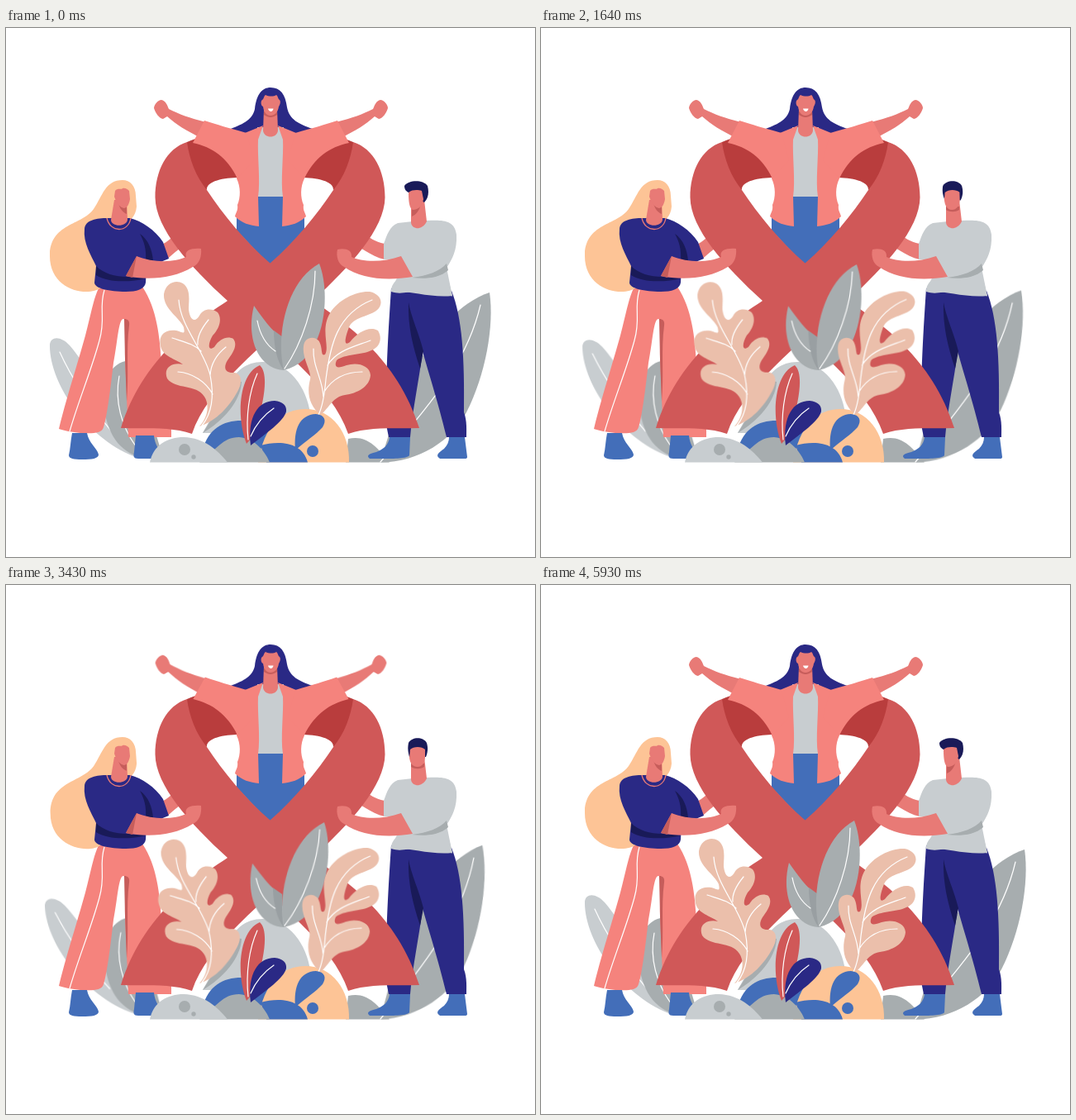
An HTML page without scripts for the animation above (6.07 s loop, 640x640 px).

```html
<!DOCTYPE html>
<html lang="en">
<head>
<meta charset="utf-8">
<title>Ribbon</title>
<style>
html, body { margin: 0; height: 100%; overflow: hidden; background: #fff; }
svg { display: block; width: 100vw; height: 100vh; }

.red { fill: #d05858; } .deep { fill: #b93d3d; }
.coral { fill: #f5837d; } .skin { fill: #e87a76; } .blush { fill: #c65d5b; }
.navy { fill: #2a2985; } .ink { fill: #191a58; } .blue { fill: #436eb9; }
.pale { fill: #c8cdd0; } .gray { fill: #a7adaf; } .slate { fill: #999fa2; }
.peach { fill: #fdc496; } .beige { fill: #ebbfab; }
.vein { fill: none; stroke: #fff; stroke-width: 1.2; stroke-linecap: round; }

.sway, .lift, .raise, .turn { animation: 6070ms cubic-bezier(.37, 0, .63, 1) infinite; }
.sway { animation-name: sway; }
.lift { animation-name: lift; }
.raise { animation-name: raise; }
.turn { animation-name: turn; }
.lift, .turn { d: var(--from); }

.sleeve {
  --from: path("M291 127 C270 121 255 117 240 112 L226 139 C250 144 268 157 280 182 L300 160Z");
  --to: path("M289 127 C281 118 273 110 265 99 L238 114 C244 135 254 148 280 162 L300 160Z");
}
.forearm {
  d: path("M242 114 C222 109 209 104 197 98 C195 93 193 88 188 87 C184 87 179 93 179 97 C181 103 185 109 190 110 L195 107 C206 117 218 124 236 133Z");
  transform-origin: 233px 126px;
  --move: translate(18.5px, -19.5px) rotate(53deg);
}

@keyframes sway {
  0%, 32.6%, 65.1%, 97.7%, 100% { transform: rotate(0deg); }
  16.3%, 48.9%, 81.4% { transform: rotate(var(--a)); }
}
@keyframes lift {
  0%, 22.7%, 35.1%, 57.8%, 70.3%, 93.1%, 100% { d: var(--from); }
  12.2%, 47.3%, 82.5% { d: var(--to); }
}
@keyframes raise {
  0%, 22.7%, 35.1%, 57.8%, 70.3%, 93.1%, 100% { transform: translate(0, 0) rotate(0deg); }
  12.2%, 47.3%, 82.5% { transform: var(--move); }
}
@keyframes turn {
  0%, 4.1%, 32.6%, 36.7%, 65.1%, 69.3%, 97.7%, 100% { d: var(--from); }
  9.9%, 25.1%, 42.4%, 57.7%, 75%, 90.2% { d: var(--to); }
}
</style>
</head>
<body>
<svg viewBox="0 0 640 640">
  <defs>
    <path id="band" class="red" d="M219 138 C194 146 180.500 173 180.500 205 C181 243 222 288 268 330 C330 385 395 435 414 491 C440 482 470 485 500 484 C474 400 409 355 371 330 L320 285 C290 259 262 225 243 196 C230 180 222 160 219 138Z"/>
    <path id="loop" class="deep" d="M219 138 C245 127 270 122 321 122 V181 H282 C264 181 242 185 243 196 C222 180 212 160 219 138Z"/>
    <path id="front" class="coral" d="M311 118 L289 127 L277 150 L279 182 C284 192 284 205 280 214 C281 221 278 223 277 228 C285 236 295 239 306 240 L305 204 C308 185 304 155 305 135Z"/>
  </defs>

  <!-- back foliage -->
  <g class="sway" style="--a:-4.6deg;transform-origin:158px 522px">
    <path class="pale" d="M160 520 C100 500 52 430 53 383 C54 373 66 372 77 384 C98 408 125 460 160 520Z"/>
    <path class="vein" d="M65 392 C80 425 100 455 127 487"/>
  </g>
  <g class="sway" style="--a:2deg;transform-origin:160px 518px">
    <path class="gray" d="M155 402 C129 400 115 425 118 455 C122 490 136 513 165 520 H190Z"/>
    <path class="vein" d="M137 421 C131 452 140 482 157 506"/>
  </g>
  <path class="gray" d="M411 525.500 L414 497 C436 492 448 506 464 525.500Z"/>
  <g class="sway" style="--a:-4.4deg;transform-origin:455px 525px">
    <path class="gray" d="M453 525.500 C470 465 510 345 585 320 C591 360 580 420 557 465 C540 498 500 525.500 453 525.500Z"/>
    <path class="vein" d="M574 335 C560 395 528 440 453 525"/>
  </g>

  <!-- legs and far arms -->
  <path class="coral" d="M112 315 L165 313 C183 340 186 375 188 405 L200 486 V495 H148 L144 400 C144 370 146 352 142 352 C136 352 135 380 130 405 C126 440 122 470 118 483 C116 492 100 490 90 490 C80 489 70 487 64 485 C75 440 92 390 99 360 C104 340 107 325 112 315Z"/>
  <path class="blush" d="M143 352 C147 352 150 354 149 360 C145 390 149 420 146 452 L144 400Z"/>
  <path class="vein" d="M119 317 C112 340 121 350 113 378 C104 412 88 450 77 488"/>
  <path class="blue" d="M80 490 H98 C100 502 110 508 112 516 C112 521 104 522 92 522 C82 522 76 521 76 517 C78 508 78 500 80 490Z"/>
  <path class="blue" d="M157 493 H179 C180 505 186 510 188 516 V521 H160 C154 521 154 518 155 513Z"/>
  <path class="navy" d="M466 315 C490 312 515 318 539 318 C552 350 555 400 554 465 C558 475 557 488 557 495 H533 C522 450 512 420 504 391 C500 425 492 460 489 495 H463 L460 480 C459 420 463 360 466 315Z"/>
  <path class="ink" d="M487 332 C490 350 500 370 505 391 L501 412 C492 385 486 360 487 332Z"/>
  <path class="blue" d="M464 495 H489 L488 517 C486 521 470 521 455 521 H440 C435 517 440 515 448 513 C456 510 463 505 464 495Z"/>
  <path class="blue" d="M536 495 H555 L558 519 Q558 521 555 521 H525 C519 517 523 514 530 509 C534 505 536 500 536 495Z"/>
  <path class="skin" d="M188 262 C196 259 200 253 208 248 L225 262 C212 262 205 272 194 280Z"/>
  <path class="skin" d="M458 261 C446 259 440 253 431 248 L418 262 C430 264 440 276 458 280Z"/>

  <use href="#loop"/>
  <use href="#loop" transform="matrix(-1 0 0 1 639 0)"/>
  <path class="blue" d="M304 202 H337 L361 230 V245 L320 288 L279 245 V228Z"/>
  <use href="#band"/>
  <use href="#band" transform="matrix(-1 0 0 1 639 0)"/>

  <!-- cheering woman -->
  <path class="navy raise" style="--move:translate(0,-2px)" d="M269 123 C285 117 298 112 301 98 C303 80 310 72 320 72 C332 72 338 80 340 96 C343 111 354 116 371 122 L351 130 H289Z"/>
  <path class="pale" d="M304 120 H336 L339 204 H302Z"/>
  <use href="#front"/>
  <use href="#front" transform="matrix(-1 0 0 1 640 0)"/>
  <g>
    <path class="forearm raise skin"/>
    <path class="sleeve lift coral"/>
  </g>
  <g transform="matrix(-1 0 0 1 641 0)">
    <path class="forearm raise skin"/>
    <path class="sleeve lift coral"/>
  </g>
  <path class="skin" d="M312 98 H328 L329 124 C328 134 312 134 311 124Z"/>
  <g class="raise" style="--move:translate(0,-2px)">
    <path class="blush" d="M312 101 H328 V105 C322 109 318 109 312 105Z"/>
    <path class="skin" d="M310 87 C312 86 312 82 314 81 C318 83 324 83 327 81 C329 82 329 86 331 87 C333 89 331 94 330 95 C329 102 325 106 320 106 C315 106 312 102 311 95 C308 94 308 88 310 87Z"/>
    <path fill="#fff" d="M317 97.500 H323.500 C323 102 318 102 317 97.500Z"/>
  </g>

  <!-- woman on the left -->
  <path class="peach lift" style="--from:path('M141 184 C150 184 157 191 157 203 L158 216 C157 228 150 234 140 240 L115 314 C100 326 53 318 53 276 C53 236 92 239 106 219 C117 203 120 184 141 184Z');--to:path('M141 184 C152 184 160 193 161 205 L161 216 C161 228 158 234 150 240 L115 325 C98 328 72 312 72 284 C72 252 98 243 110 220 C115 203 122 184 141 184Z')"/>
  <path class="navy" d="M123 230 C110 230 96 232 95 243 C93 260 103 275 109 288 L107 308 C107 315 125 319 145 319 C158 319 168 316 169 308 L170 290 L197 279 L190 259 C180 244 165 234 150 230Z"/>
  <path class="ink" d="M109 288 C118 297 132 301 147 301 L169 303 C150 308 122 308 109 299Z"/>
  <path class="ink" d="M162 249 C172 256 177 268 178 282 L169 280 C170 268 167 258 162 249Z"/>
  <path class="skin" d="M131 208 H146 L147 232 C146 241 127 241 127 232Z"/>
  <path class="blush lift" style="--from:path('M136 212 L146 214 L146 225 C141 223 138 219 136 212Z');--to:path('M130 211 L146 211 L145 219 C141 223 134 222 130 219Z')"/>
  <path class="skin lift" style="--from:path('M131 204 L132 197 C135 193 139 196 141 194 C144 193 147 195 149 197 L150 207 C149 213 147 217 143 218 C138 217 134 213 131 204Z');--to:path('M129 203 L130 196 C133 193 137 196 140 194 C144 193 146 195 148 198 L151 199 C151 205 147 204 147 207 C145 214 140 215 138 215 C133 214 130 211 129 203Z')"/>
  <path d="M122 230 C126 248 148 248 151 230" fill="none" stroke="#e87a76" stroke-width="1.3"/>
  <path class="skin" d="M158 276 C180 285 205 283 218 277 C215 268 226 266 236 267 C237 276 234 286 226 289 C202 304 170 305 145 300Z"/>
  <path class="blush" d="M158 276 L145 300 L153 302Z"/>

  <!-- man on the right -->
  <path class="pale" d="M492 234 L474 236 C464 240 461 250 457 261 V280 L470 281 L478 300 C470 305 465 314 466 319 C484 325 490 312 540 324.500 L533 290 C540 280 546 268 545 250 C543 232 528 232 509 233Z"/>
  <path class="pale" d="M466 319 C484 316 512 327 540 324 L534 300 H474Z"/>
  <path class="gray" d="M491 302 C510 300 525 294 533 285 L535 293 C524 303 506 304 491 302Z"/>
  <path class="skin" d="M490 208 H506 L509 234 C506 241 499 243 496 242 C492 241 490 238 490 235Z"/>
  <path class="blush turn" style="--from:path('M491 217 L502 213 C500 221 496 226 491 228Z');--to:path('M490 216 L506 216 L506 220 C501 223 495 223 490 220Z')"/>
  <path class="ink turn" style="--from:path('M482 191 C487 184 504 183 510 191 C512 199 511 206 506 211 L487 199 C483 197 482 194 482 191Z');--to:path('M487 191 C491 184 504 183 509 191 C511 198 510 203 508 208 L488 208 C486 201 486 196 487 191Z')"/>
  <path class="skin turn" style="--from:path('M487 199 C492 195 499 196 503 197 L505 207 C504 215 499 220 492 220 C488 218 487 210 487 199Z');--to:path('M489 199 C493 195 503 195 507 199 L507 209 C506 216 503 220 498 220 C492 220 489 216 488 209Z')"/>
  <path class="skin" d="M478 276 C456 284 430 283 418 277 C419 268 410 266 401 268 C399 276 402 286 409 289 C430 304 462 306 492 301Z"/>

  <!-- rocks -->
  <path class="pale" d="M238 490 C262 450 270 404 310 404 C343 404 364 436 368 466 V490Z"/>
  <path class="gray" d="M238 490 C254 466 262 448 268 425 L285 428 C284 452 262 476 238 490Z"/>
  <path class="blue" d="M238 510 C245 485 262 475 285 475 C315 475 326 492 332 515Z"/>
  <path class="peach" d="M305 525.500 C312 480 335 461 362 461 C395 461 416 490 415 525.500Z"/>
  <path class="blue" d="M308 505 C330 499 358 500 365 525.500 H315Z"/>
  <path class="gray" d="M234 525.500 C255 510 262 495 282 495 C302 496 315 515 319 525.500Z"/>
  <path class="pale" d="M174 525.500 C178 505 195 495 215 495 C240 496 255 510 268 525.500Z"/>
  <circle class="gray" cx="216" cy="510" r="7"/>
  <circle class="gray" cx="227" cy="519" r="2.700"/>

  <!-- front plants -->
  <g class="sway" style="--a:-2.4deg;transform-origin:336px 414px">
    <path class="gray" d="M336 414 C305 412 290 375 300 336 C310 350 322 368 334 374Z"/>
    <path class="slate" d="M324 366 L335 374 L336 414 C328 404 324 385 324 366Z"/>
    <path class="vein" d="M304 354 C308 375 317 385 326 391"/>
  </g>
  <g class="sway" style="--a:4.9deg;transform-origin:336px 414px">
    <path class="gray" d="M336 414 C326 370 340 306 379 285 C393 320 388 402 336 414Z"/>
    <path class="vein" d="M374 294 C374 335 358 382 337 412"/>
  </g>
  <g class="sway" style="--a:-2.3deg;transform-origin:238px 482px">
    <path class="beige" d="M234 482 C245 470 246 455 240 446 C230 430 205 438 195 424 C190 412 200 404 214 407 C205 400 190 398 187 385 C184 372 192 364 206 366 C214 368 217 372 215 362 C210 350 190 340 191 322 C193 308 206 304 214 309 C224 316 221 330 221 340 C222 352 228 358 234 348 C238 340 248 338 256 344 C262 352 258 364 250 372 C244 382 244 392 252 386 C258 376 268 372 275 376 C281 384 274 394 268 402 C262 412 266 418 276 417 C286 418 286 430 280 440 C270 458 255 475 234 482Z"/>
    <path class="vein" d="M209 329 C211 362 240 390 247 420 C252 445 250 465 237 481 M201 375 C216 380 227 382 236 391 M245 353 C236 364 231 373 232 383 M208 416 C225 417 242 428 250 443 M266 386 C256 394 248 405 247 420"/>
  </g>
  <g class="sway" style="--a:-1.8deg;transform-origin:380px 468px">
    <path class="beige" d="M381 468 C366 457 364 440 368 425 C370 415 358 400 360 385 C361 374 372 372 378 378 C384 386 380 398 386 395 C392 385 380 365 392 345 C402 328 425 318 440 319 C454 322 458 334 448 342 C436 350 420 350 415 362 C410 375 408 386 416 380 C425 368 440 360 450 366 C456 376 452 386 442 390 C430 396 410 394 400 402 C396 412 402 412 412 408 C425 404 440 408 441 420 C440 434 425 442 410 444 C396 446 392 458 381 468Z"/>
    <path class="vein" d="M443 329 C400 346 392 385 387 425 C385 448 382 460 378 468 M441 378 C420 386 400 390 389 408 M431 416 C410 416 395 424 385 440 M372 388 C371 410 383 424 384 446"/>
  </g>
  <path class="red" d="M291 503 C278 470 282 418 307 408 C318 418 312 450 305 475 C302 488 298 496 291 503Z"/>
  <path class="vein" d="M304 418 C294 440 290 470 293 498"/>
  <path class="navy" d="M296 505 C292 470 305 451 325 451 C335 452 340 457 339 464 C336 476 315 490 296 505Z"/>
  <path class="vein" d="M324 460 C312 468 302 480 296 494"/>
  <path class="blue" d="M350 511 C348 485 355 468 375 467 C386 468 388 475 383 483 C375 492 362 500 350 511Z"/>
  <circle class="blue" cx="371" cy="512" r="7"/>
</svg>
</body>
</html>
```
